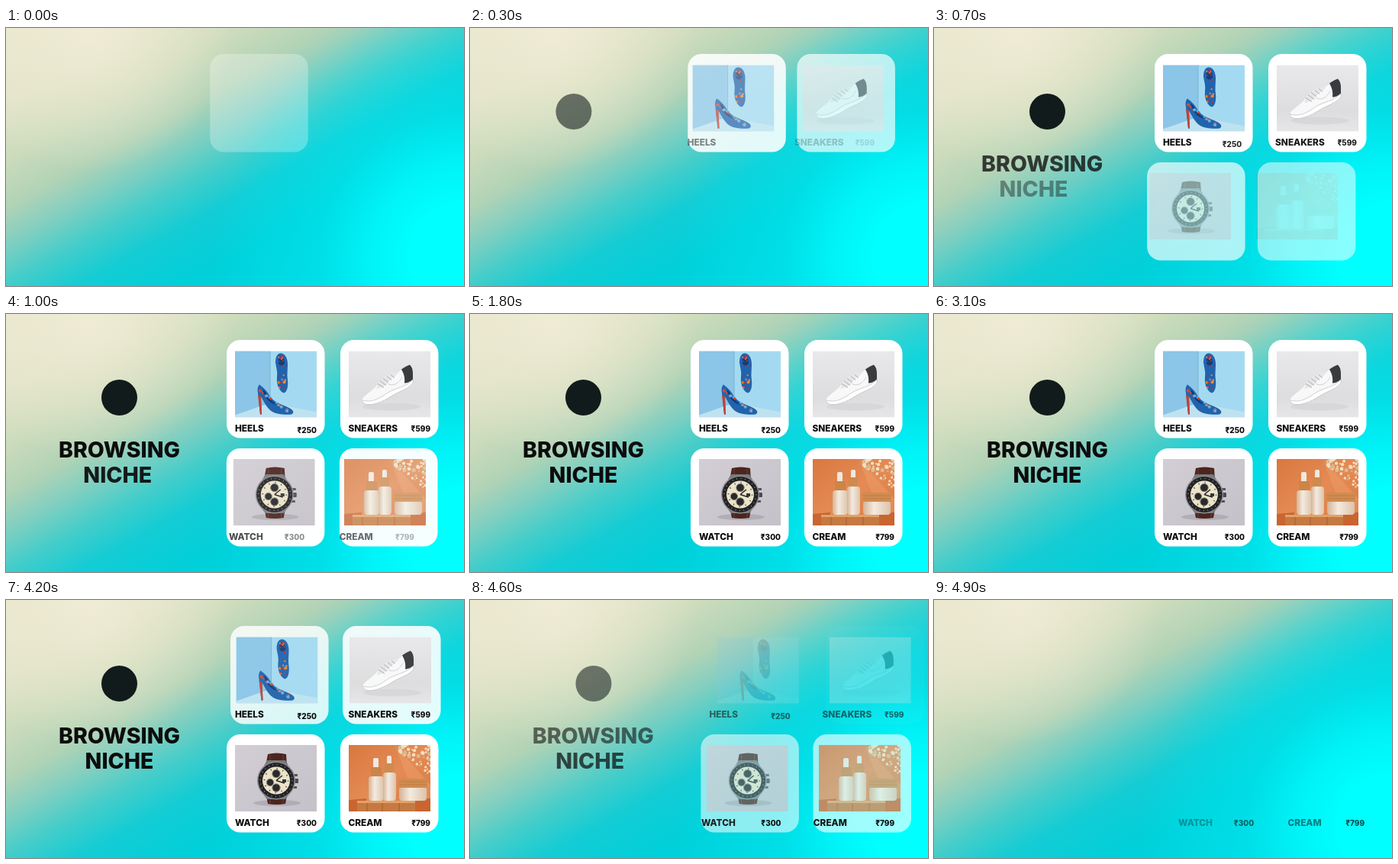
An HTML page for the animation above (5 s loop, 600 px wide and 338 px high).

```html
<!DOCTYPE html>
<html lang="en">
<head>
<meta charset="utf-8">
<title>Shop promo</title>
<style>
html, body { margin: 0; width: 100%; height: 100%; overflow: hidden; }
body {
  background:
    radial-gradient(circle at 600px 300px, #0ff 0 70px, rgba(0,246,250,.9) 125px, rgba(0,232,240,.55) 190px, rgba(0,222,232,0) 330px),
    radial-gradient(circle at 110px 0, rgba(241,237,216,.9) 0, rgba(238,234,210,.6) 80px, rgba(232,230,204,0) 190px),
    linear-gradient(151deg, #ebe8d0 0, #e0e3c8 15%, #cddcbc 25%, #b2d3b6 35%, #84cfc0 42%, #44cdca 50%, #14ccd4 58%, #00d0da 70%, #00d8e2 100%);
}
svg { display: block; width: 100%; height: 100%; }
text { font-family: Inter, "Open Sans", sans-serif; font-weight: 800; fill: #0c0c0c; }
.title { font-size: 28.5px; text-anchor: middle; }
.label { font-size: 11.8px; }
.price { font-size: 10px; text-anchor: end; }
</style>
</head>
<body>
<svg viewBox="0 0 600 338">
  <defs>
    <clipPath id="frame"><rect width="107" height="87"/></clipPath>
    <linearGradient id="studio" x2="0" y2="1"><stop stop-color="#e9e8ea"/><stop offset=".7" stop-color="#dddcde"/><stop offset="1" stop-color="#e6e5e7"/></linearGradient>
    <linearGradient id="mauve" x2="1" y2="1"><stop stop-color="#d2ced4"/><stop offset="1" stop-color="#c5c1c9"/></linearGradient>
    <linearGradient id="clay" x2="1" y2="1"><stop stop-color="#d9783f"/><stop offset=".5" stop-color="#e48b55"/><stop offset="1" stop-color="#d9763f"/></linearGradient>
    <linearGradient id="glass" x2="1" y2="0"><stop stop-color="#d5b396"/><stop offset=".4" stop-color="#f4ebe0"/><stop offset="1" stop-color="#dcc3aa"/></linearGradient>
  </defs>

  <g id="cards" fill="#fff"></g>

  <g id="heels"><g transform="translate(300 48.5)" clip-path="url(#frame)">
    <path d="M0 0H107V87H0Z" fill="#a4daf1"/>
    <path d="M0 0H46V68L0 84Z" fill="#8bc6e8"/>
    <path d="M0 84L46 68L107 80V87H0Z" fill="#bfe2f0"/>
    <path d="M46 0V68" stroke="#78b4d8"/>
    <path d="M59 3C65 2 69 9 69 17C69 25 68 30 69 38C70 47 68 54 64 55C58 53 54 44 55 34C56 27 54 22 53 15C53 8 55 4 59 3Z" fill="#2163ad"/>
    <path d="M57 8C60 5 65 9 65 16C63 20 58 20 57 16Z" fill="#173c78"/>
    <path d="M32 44C38 48 42 53 45 58C51 68 62 70 70 74C77 77 78 81 74 83C66 84 54 83 48 79C41 74 38 66 34 60L35 83H33L30 55C29 50 30 46 32 44Z" fill="#2163ad"/>
    <path d="M36 50C42 54 45 64 54 70C48 70 40 64 36 50Z" fill="#153a74"/>
    <path d="M30 57L33 83H35L34 60Z" fill="#c8402f"/>
    <g id="dots"></g>
  </g></g>

  <g id="shoe"><g transform="translate(449 48.5)" clip-path="url(#frame)">
    <path d="M0 0H107V87H0Z" fill="url(#studio)"/>
    <ellipse cx="56" cy="73" rx="38" ry="5" fill="#cfced1" opacity=".5"/>
    <path d="M18 62C24 55 33 51 39 42C43 36 50 31 57 30L65 28C70 24 75 20 80 18C85 22 84 31 84 39C78 49 65 51 55 57C45 64 31 70 21 69C17 67 16 65 18 62Z" fill="#f8f8f8"/>
    <path d="M17 64C30 69 42 61 52 54C62 48 76 47 84 37L84 42C77 51 65 53 56 59C46 66 29 73 20 69Z" fill="#fff" stroke="#c2c2c4" stroke-width=".8"/>
    <path d="M69 24C73 21 77 19 80 18C85 23 84 30 84 37C80 41 76 42 73 42C74 35 72 29 69 24Z" fill="#3a3b3f"/>
    <path d="M39 42C43 36 50 31 57 30L65 28C62 34 54 36 51 42C47 46 42 48 36 50Z" fill="#e7e7e9"/>
    <path d="M38 43L46 48M41 39L49 45M45 36L52 41M50 33L56 38M55 31L60 35" stroke="#aaaab0"/>
    <path d="M51 43C59 47 66 42 70 34" fill="none" stroke="#d0d0d3"/>
  </g></g>

  <g id="watch"><g transform="translate(300 190)" clip-path="url(#frame)">
    <path d="M0 0H107V87H0Z" fill="url(#mauve)"/>
    <ellipse cx="55" cy="76" rx="31" ry="4" fill="#9c969f" opacity=".5"/>
    <path d="M43 12Q54 9 67 12L68 28H40ZM41 66H68L66 77Q54 79 43 77Z" fill="#4b251e"/>
    <path d="M46 13V25M63 13V25M46 67V76M63 67V76" stroke="#71402f"/>
    <path d="M38 27L42 20H66L70 27V66L66 71H42L38 66Z" fill="#77777b"/>
    <rect x="77" y="38" width="5" height="3" fill="#555"/><rect x="78" y="44" width="5" height="6" rx="1" fill="#4c4c50"/><rect x="76" y="54" width="5" height="3" fill="#555"/>
    <circle cx="54" cy="46.500" r="25" fill="#8c8c90"/>
    <circle cx="54" cy="46.500" r="23.500" fill="#232326"/>
    <circle cx="54" cy="46.500" r="18" fill="#ebe3c9"/>
    <circle cx="54" cy="46.500" r="15.500" fill="none" stroke="#58534a" stroke-width="2" stroke-dasharray="1.200 6.920"/>
    <circle cx="54" cy="46.500" r="21" fill="none" stroke="#aaa" stroke-width="1.500" stroke-dasharray=".8 4.700"/>
    <g fill="#29292c" stroke="#8d887c"><circle cx="54" cy="37.500" r="5.200"/><circle cx="46" cy="49" r="4.700"/><circle cx="54" cy="56" r="5.200"/></g>
    <path d="M54 46.500L62 40M54 46.500L65 50" stroke="#252525" stroke-width="1.500"/>
    <rect x="62" y="45" width="5" height="4" fill="#333"/>
  </g></g>

  <g id="cream"><g transform="translate(449 190)" clip-path="url(#frame)">
    <path d="M0 0H107V87H0Z" fill="url(#clay)"/>
    <path d="M0 72L23 70V87H0ZM87 72L107 69V87H87Z" fill="#c9652f"/>
    <path d="M60 0L107 52V70L88 72Z" fill="#eea06b" opacity=".45"/>
    <g id="petals"></g>
    <path d="M11 73H87V87H11Z" fill="#c57a43"/>
    <path d="M11 73H87V76H11Z" fill="#e3a267"/>
    <path d="M24 76V87M44 76V87M66 76V87" stroke="#a75d2d"/>
    <rect x="32" y="17" width="7" height="14" rx="2" fill="#f0e8df"/>
    <rect x="29" y="29" width="14" height="13" rx="1" fill="#cb8549"/>
    <rect x="26" y="41" width="20" height="32" rx="4" fill="url(#glass)"/>
    <rect x="50" y="14" width="6" height="12" rx="2" fill="#f0e8df"/>
    <rect x="47" y="24" width="12" height="13" rx="1" fill="#cf8a4e"/>
    <rect x="45" y="36" width="17" height="37" rx="4" fill="url(#glass)"/>
    <rect x="66" y="55" width="36" height="18" rx="4" fill="url(#glass)"/>
    <rect x="65" y="44" width="38" height="12" rx="2" fill="#d08c50"/>
    <path d="M66 48H102M66 52H102" stroke="#bb743c" stroke-width=".7"/>
  </g></g>

  <circle id="mark" cx="148.500" cy="109.500" r="23.500" fill="#111b1b"/>
  <text id="name1" class="title" x="148.500" y="188">BROWSING</text>
  <text id="name2" class="title" x="148.500" y="221">NICHE</text>
  <g id="labels"></g>
</svg>
<script>
const LOOP = 5000, MOVE = 600, SHIFT = 30;
const $ = id => document.getElementById(id);

function add(parent, tag, attrs, text = "") {
  const el = document.createElementNS("http://www.w3.org/2000/svg", tag);
  for (const key in attrs) el.setAttribute(key, attrs[key]);
  el.textContent = text;
  return parent.appendChild(el);
}

function random(seed) {
  return () => (seed = seed * 16807 % 2147483647) / 2147483647;
}

const card = (x, y) => add($("cards"), "rect", { x, y, width: 128.5, height: 128.5, rx: 18 });
const label = (x, y, text) => add($("labels"), "text", { x, y, class: "label" }, text);
const price = (x, y, text) => add($("labels"), "text", { x, y, class: "price" }, text);

// Element, time it slides in, time it slides out
const parts = [
  [card(289, 34), -88, 3955],
  [card(438, 34), 40, 4010],
  [card(289, 176), 445, 4200],
  [card(438, 176), 512, 4230],
  [$("heels"), 20, 4066],
  [$("shoe"), 100, 4090],
  [$("watch"), 565, 4260],
  [$("cream"), 670, 4290],
  [$("mark"), 90, 4200],
  [$("name1"), 388, 4210],
  [$("name2"), 565, 4280],
  [label(300, 154, "HEELS"), 130, 4200],
  [label(448.5, 154, "SNEAKERS"), 232, 4205],
  [label(300, 296, "WATCH"), 712, 4410],
  [label(448.5, 296, "CREAM"), 778, 4476],
  [price(407, 155.5, "₹250"), 316, 4210],
  [price(556, 153.5, "₹599"), 259, 4215],
  [price(407, 295.5, "₹300"), 838, 4520],
  [price(556, 295.5, "₹799"), 904, 4590]
];

// Printed pattern on the heels
const rnd = random(41);
const tints = ["#d94832", "#e9883a", "#63b2dc", "#b8322f"];
for (let i = 0; i < 34; i++) {
  const k = rnd(), first = i % 2;
  const cx = first ? 57 + rnd() * 9 : 33 + k * 38;
  const cy = first ? 7 + k * 42 : 51 + k * 27 + rnd() * 3;
  add($("dots"), "circle", { cx, cy, r: 0.8 + rnd() * 1.3, fill: tints[i % 4] });
}

// Small blossoms in the top right corner
for (let i = 0; i < 60; i++) {
  const x = rnd();
  add($("petals"), "circle", {
    cx: 66 + x * 41, cy: rnd() * (8 + x * 32), r: 1 + rnd() * 1.6,
    fill: i % 3 ? "#f3dfc2" : "#d9b98c"
  });
}

const clamp = v => Math.min(1, Math.max(0, v));

function draw(t) {
  for (const [el, start, end] of parts) {
    const left = (1 - clamp((t - start) / MOVE)) ** 2;
    const gone = clamp((t - end) / MOVE) ** 2;
    el.setAttribute("transform", `translate(${SHIFT * (gone - left)} 0)`);
    el.setAttribute("opacity", (1 - left) * (1 - gone));
  }
}

const begin = performance.now();
function tick() {
  draw((performance.now() - begin) % LOOP);
  requestAnimationFrame(tick);
}
tick();
</script>
</body>
</html>
```
